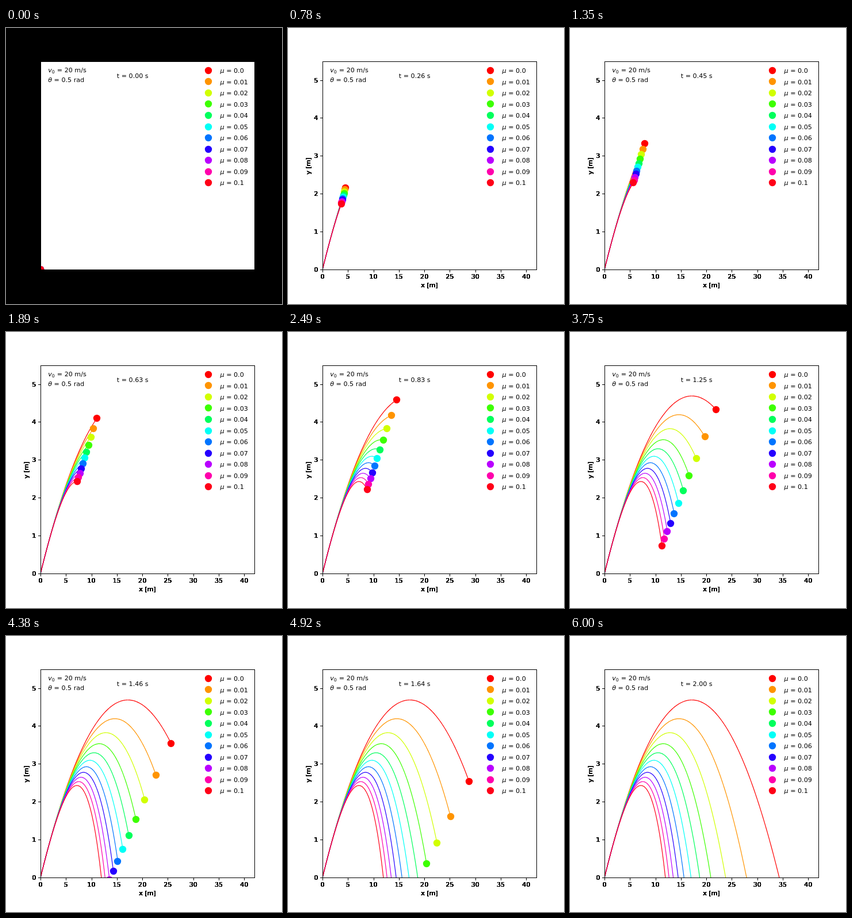
An HTML page with a canvas for the animation above (6030 ms loop, 480x480 px).

```html
<!DOCTYPE html>
<html lang="en">
<head>
<meta charset="utf-8">
<title>Projectile motion with air drag</title>
<style>
  html, body { margin: 0; width: 100%; height: 100%; overflow: hidden; background: #fff; }
  canvas { display: block; }
</style>
</head>
<body>
<canvas id="stage" width="480" height="480"></canvas>
<script>
const ctx = document.getElementById('stage').getContext('2d');

const STEP_MS = 30, STEPS = 201, DT = 0.01;
const V0 = 20, ANGLE = 0.5, G = 9.81;
const BOX = { left: 60, right: 432, top: 57.6, bottom: 420 };
const X_MAX = 42, Y_MAX = 5.5;
const SIZE = 11.11, DOT_R = 6.2;
const FAMILY = '"DejaVu Sans", sans-serif';

const px = x => BOX.left + x * (BOX.right - BOX.left) / X_MAX;
const py = y => BOX.bottom - y * (BOX.bottom - BOX.top) / Y_MAX;
const snap = v => Math.floor(v + 0.5) + 0.5;

// Quadratic drag: a = -mu |v| v - g
function slope([, , vx, vy], mu) {
  const drag = mu * Math.hypot(vx, vy);
  return [vx, vy, -drag * vx, -G - drag * vy];
}

function rk4(s, mu) {
  const shift = (k, h) => s.map((v, i) => v + k[i] * h);
  const a = slope(s, mu);
  const b = slope(shift(a, DT / 2), mu);
  const c = slope(shift(b, DT / 2), mu);
  const d = slope(shift(c, DT), mu);
  return s.map((v, i) => v + DT / 6 * (a[i] + 2 * b[i] + 2 * c[i] + d[i]));
}

function flight(mu) {
  let s = [0, 0, V0 * Math.cos(ANGLE), V0 * Math.sin(ANGLE)];
  const path = [];
  for (let i = 0; i < STEPS; i++) {
    path.push([px(s[0]), py(s[1])]);
    s = rk4(s, mu);
  }
  return path;
}

const balls = Array.from({ length: 11 }, (_, i) => {
  const shade = Math.min(255, Math.floor(i * 25.6));
  return {
    label: i ? String(i / 100) : '0.0',
    color: `hsl(${shade / 255 * 354.375}, 100%, 50%)`,
    path: flight(i / 100)
  };
});

function text(str, x, y, { align = 'left', style = '', size = SIZE } = {}) {
  ctx.font = `${style} ${size}px ${FAMILY}`;
  ctx.textAlign = align;
  ctx.fillText(str, x, y);
  return x + ctx.measureText(str).width;
}

function symbol(char, rest, x, y, sub) {
  x = text(char, x, y, { style: 'italic' });
  if (sub) x = text(sub, x, y + 1.8, { size: SIZE * 0.7 }) + 0.5;
  text(rest, x, y);
}

function dot(x, y, color) {
  ctx.fillStyle = color;
  ctx.beginPath();
  ctx.arc(Math.round(x), Math.round(y), DOT_R, 0, 2 * Math.PI);
  ctx.fill();
}

function drawAxisText() {
  for (let x = 0; x <= 40; x += 5) text(x, px(x), 436, { align: 'center' });
  for (let y = 0; y <= 5; y++) text(y, 52.4, Math.round(py(y) + 4), { align: 'right' });
  text('x [m]', 246, 451, { align: 'center' });
  ctx.save();
  ctx.translate(39, 240);
  ctx.rotate(-Math.PI / 2);
  text('y [m]', 0, 0, { align: 'center' });
  ctx.restore();
}

function drawFrame() {
  ctx.fillStyle = '#000';
  for (let x = 0; x <= 40; x += 5) ctx.fillRect(snap(px(x)) - 0.5, 420, 1, 5);
  for (let y = 0; y <= 5; y++) ctx.fillRect(56, snap(py(y)) - 0.5, 5, 1);
  ctx.strokeStyle = '#000';
  ctx.lineWidth = 1;
  ctx.strokeRect(60.5, 58.5, 372, 362);
}

function drawFlights(step) {
  ctx.save();
  ctx.beginPath();
  ctx.rect(60, 58, 372, 362);
  ctx.clip();
  ctx.lineWidth = 1.2;
  ctx.lineJoin = 'round';
  for (const { path, color } of balls) {
    ctx.strokeStyle = color;
    ctx.beginPath();
    for (let i = 0; i <= step; i++) ctx.lineTo(...path[i]);
    ctx.stroke();
  }
  for (const { path, color } of balls) dot(...path[step], color);
  ctx.restore();
}

function drawNotes(step) {
  ctx.fillStyle = '#000';
  symbol('v', ' = 20 m/s', px(1.5), 77, '0');
  symbol('θ', ' = 0.5 rad', px(1.5), 94);
  text(`t = ${(step * DT).toFixed(2)} s`, px(15), 87);
  balls.forEach(({ label, color }, i) => {
    const y = 73.9 + i * 19.52;
    dot(352, y, color);
    ctx.fillStyle = '#000';
    symbol('μ', ` = ${label}`, 372.6, Math.round(y + 4.2));
  });
}

function draw(step) {
  ctx.fillStyle = step ? '#fff' : '#000';
  ctx.fillRect(0, 0, 480, 480);
  ctx.fillStyle = '#fff';
  ctx.fillRect(60, 58, 372, 362);
  drawFlights(step);
  drawFrame();
  // Axis lettering darkens as it is overprinted
  for (let i = Math.min(step, 10); i > 0; i--) drawAxisText();
  drawNotes(step);
}

const start = performance.now();
let shown = -1;

function tick() {
  const step = Math.floor((performance.now() - start) / STEP_MS) % STEPS;
  if (step !== shown) draw(shown = step);
  requestAnimationFrame(tick);
}
tick();
</script>
</body>
</html>
```
